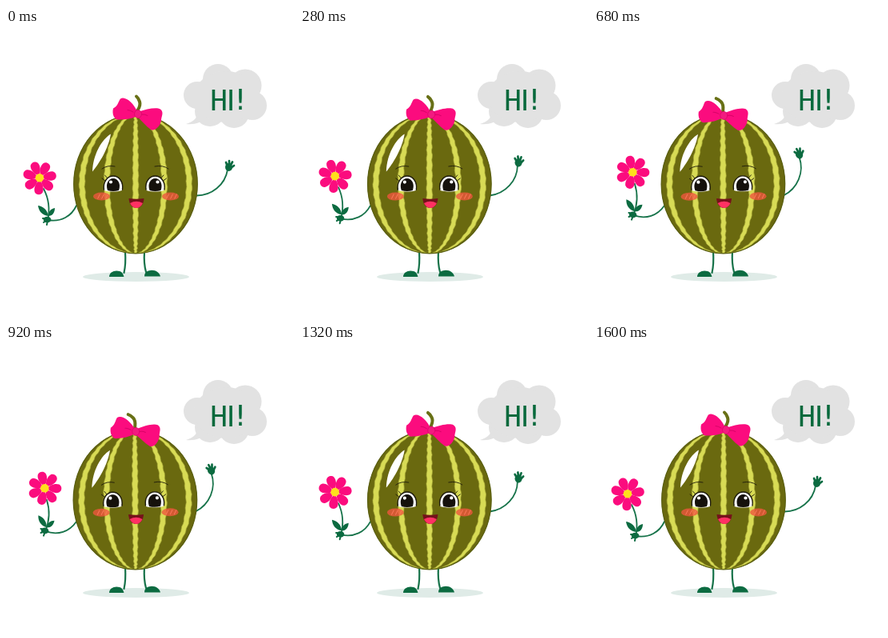
Animation of 360x360 px, one loop 1680 ms. Source, as an HTML page:

```html
<!DOCTYPE html>
<html lang="en">
<head>
<meta charset="utf-8">
<title>Waving melon</title>
<style>
html, body { margin: 0; width: 100%; height: 100%; overflow: hidden; background: #fff; }
svg { display: block; width: 100vw; height: 100vh; }
.limb { fill: none; stroke: #17734a; stroke-width: 1.8; stroke-linecap: round; }
.leg { stroke-width: 2.2; }
.green { fill: #0c6b41; }
.finger { fill: none; stroke: #0c6b41; stroke-width: 2.7; stroke-linecap: round; }
.small { stroke-width: 2; }
.ink { fill: none; stroke: #1d1a0c; stroke-width: 1.4; stroke-linecap: round; }
.fine { stroke-width: .9; }
.pink { fill: #fb0c7e; }
.fold { fill: none; stroke: #d80468; stroke-width: 1; stroke-linecap: round; }
</style>
</head>
<body>
<svg viewBox="0 0 360 360">
  <defs>
    <clipPath id="rind"><ellipse cx="162" cy="195" rx="77.5" ry="87"/></clipPath>
    <g id="eye">
      <path d="M-11 8C-13-3-7-10 0-10S13-3 11 8C4 10-4 10-11 8Z" fill="#fff"/>
      <path d="M-7 8C-10 0-6-7 0-7S10 0 7 8Q0 10-7 8Z" fill="#15110c"/>
      <circle cx="-3" cy="-2.5" r="2.1" fill="#fff"/>
      <path class="ink" d="M-11.500 7C-13-3-7-10 0-10S13-3 11.500 7"/>
      <path class="ink fine" d="M-10-4l-4-3M-7.500-7.500l-3-3.500"/>
    </g>
    <g id="cheek">
      <ellipse rx="10.500" ry="5" fill="#ee563c" opacity=".8"/>
      <path d="M-5 3l3-6M0 3l3-6M5 3l3-6" stroke="#fa7658" stroke-width="1"/>
    </g>
  </defs>
  <rect width="360" height="360" fill="#fff"/>

  <g fill="#e2e2e2">
    <circle cx="239" cy="84" r="17"/><circle cx="265" cy="64" r="19"/>
    <circle cx="299" cy="72" r="20.500"/><circle cx="308" cy="97" r="18"/>
    <circle cx="285" cy="106" r="19"/><circle cx="255" cy="104" r="19"/>
    <ellipse cx="275" cy="86" rx="40" ry="32"/>
    <path d="M239 104C241 111 235 117 225 120C236 121 245 118 251 112Z"/>
  </g>
  <g font-size="36" fill="#08693c" text-anchor="middle">
    <text x="266" y="103" font-family="'DejaVu Sans Mono', monospace">H<tspan
      x="281 293" y="102.500 101.500" font-family="'DejaVu Sans', sans-serif">I!</tspan></text>
  </g>

  <ellipse cx="162.500" cy="311" rx="66.500" ry="6" fill="#dfebe7"/>
  <path class="limb leg" d="M149 280Q150 295 147.500 306M173 280Q172 294 175 305"/>
  <path class="green" d="M129 311C129 305 136 302 142 304Q146 305 147.500 311ZM173 310.500Q173 305 178 303.500C185 301 192 305 193 310.500Z"/>

  <g id="body">
    <g id="left">
      <path class="limb" d="M88 222C82 235 69 243 52 240"/>
      <path class="limb" d="M52 241C55 227 54 214 47 201"/>
      <path class="green" d="M53 235C45 234 41 229 40 222C47 223 52 228 53 235ZM53 235C53 229 56 226 61 225C61 231 58 235 53 235Z"/>
      <ellipse class="green" cx="51.500" cy="239.500" rx="4.800" ry="3.800"/>
      <path class="finger small" d="M50 238L46 238M50 241L47 243M52 241L51 246"/>
      <g id="flower" transform="translate(42 187.300)"></g>
    </g>
    <g id="right">
      <path class="limb" d="M237 209.500C257 210 274 196 277 177"/>
      <ellipse class="green" cx="278.500" cy="174" rx="4.500" ry="5"/>
      <path class="finger" d="M277 173L275 168M279 172L279 166M280 173L283 167.500M281 175L285 172"/>
    </g>

    <path id="stem" d="M163 106C165 101 169 98 167 92C166 89 165 87 163 85.500" fill="none"
      stroke="#687016" stroke-width="4" stroke-linecap="round"/>
    <ellipse cx="162" cy="195" rx="77.500" ry="87" fill="#6a690f"/>
    <g id="stripes" clip-path="url(#rind)" fill="#d8db55" stroke="#a5a736" stroke-width=".7"></g>
    <ellipse cx="162" cy="195" rx="77.300" ry="86.800" fill="none" stroke="#5a5f12" stroke-width="1.200"/>
    <path d="M131 132.500C120 139 108.500 158 108 179.500C116 170 128 151 131 132.500Z" fill="#fff"/>

    <use href="#eye" x="134" y="195"/>
    <use href="#eye" transform="translate(186.500 195) scale(-1 1)"/>
    <path class="ink fine" d="M120 176Q127 171 136 173M186 173Q196 171 203 176"/>
    <use href="#cheek" x="119.500" y="210.500"/>
    <use href="#cheek" x="205.500" y="210.500"/>
    <path d="M153.500 213Q163 214.500 172.500 213C172 221 168 225 163 225S154 221 153.500 213Z" fill="#74121a"/>
    <path d="M155 219Q163 214.500 171 219C169 223 166 225 163 225S157 223 155 219Z" fill="#ff3163"/>

    <g id="bow">
      <path class="pink" d="M164 104C160 94 149 84 143 88C140 92 140 97 134 100C132 108 136 115 141 114C149 114 156 113 163 110ZM166 104C175 101 188 98 193 101C198 105 194 110 194 115C193 122 186 129 181 126.500C175 122 170 116 165 111Z"/>
      <path class="fold" d="M159 104.500Q155 102 152 102M169 107.500Q174 107 177 109"/>
      <ellipse cx="165" cy="107" rx="4.500" ry="5" fill="#f21a80" stroke="#d80468" stroke-width=".7"/>
    </g>
  </g>
</svg>
<script>
const $ = id => document.getElementById(id);
const add = (parent, tag, attrs) => {
  const el = document.createElementNS('http://www.w3.org/2000/svg', tag);
  for (const k in attrs) el.setAttribute(k, attrs[k]);
  parent.append(el);
};

// A meridian of the rind with rippled edges, wider at the equator.
function stripe(a) {
  const sides = [[], []], n = 80;
  for (let i = 0; i <= n; i++) {
    const u = -Math.PI / 2 + Math.PI * i / n;
    const x = 162 + a * Math.cos(u), y = 195 + 87 * Math.sin(u);
    const half = 1 + 2.5 * Math.cos(u);
    [-1, 1].forEach((s, k) => {
      const ripple = 0.5 * Math.sin(i * 1.7 + k * 2 + a);
      sides[k].push((x + s * (half + ripple)).toFixed(1) + ' ' + y.toFixed(1));
    });
  }
  return 'M' + sides[0].concat(sides[1].reverse()).join('L') + 'Z';
}
for (const a of [-67, -36, 0, 36, 67]) add($('stripes'), 'path', { d: stripe(a) });

for (let i = 0; i < 7; i++) {
  add($('flower'), 'path', {
    class: 'pink',
    d: 'M3 0C6-4 13-7 18-5C22-3 22 3 18 5C13 7 6 4 3 0Z',
    transform: `rotate(${-112 + i * 360 / 7})`
  });
}
add($('flower'), 'circle', { r: 5.3, fill: '#ffdf1c' });

const LOOP = 1680, STEP = 40, SWAY = 1600;
const turn = (id, deg, x, y, shift = '') =>
  $(id).setAttribute('transform', `${shift}rotate(${deg} ${x} ${y})`);

function draw(now) {
  const t = Math.min(Math.floor(now % LOOP / STEP) * STEP, SWAY);
  const p = (1 - Math.cos(2 * Math.PI * t / SWAY)) / 2;
  turn('body', -0.4 * p, 162, 282);
  turn('right', -29.5 * p, 238, 209);
  turn('left', 11 * p, 88, 222);
  turn('stem', -25 * p, 163, 105, `translate(${-1.3 * p} ${p})`);
  turn('bow', -4 * p, 165, 107, `translate(${-1.7 * p} ${0.5 + 2 * p})`);
}

const start = performance.now();
function tick() {
  draw(Math.round(performance.now() - start));
  requestAnimationFrame(tick);
}
tick();
</script>
</body>
</html>
```
